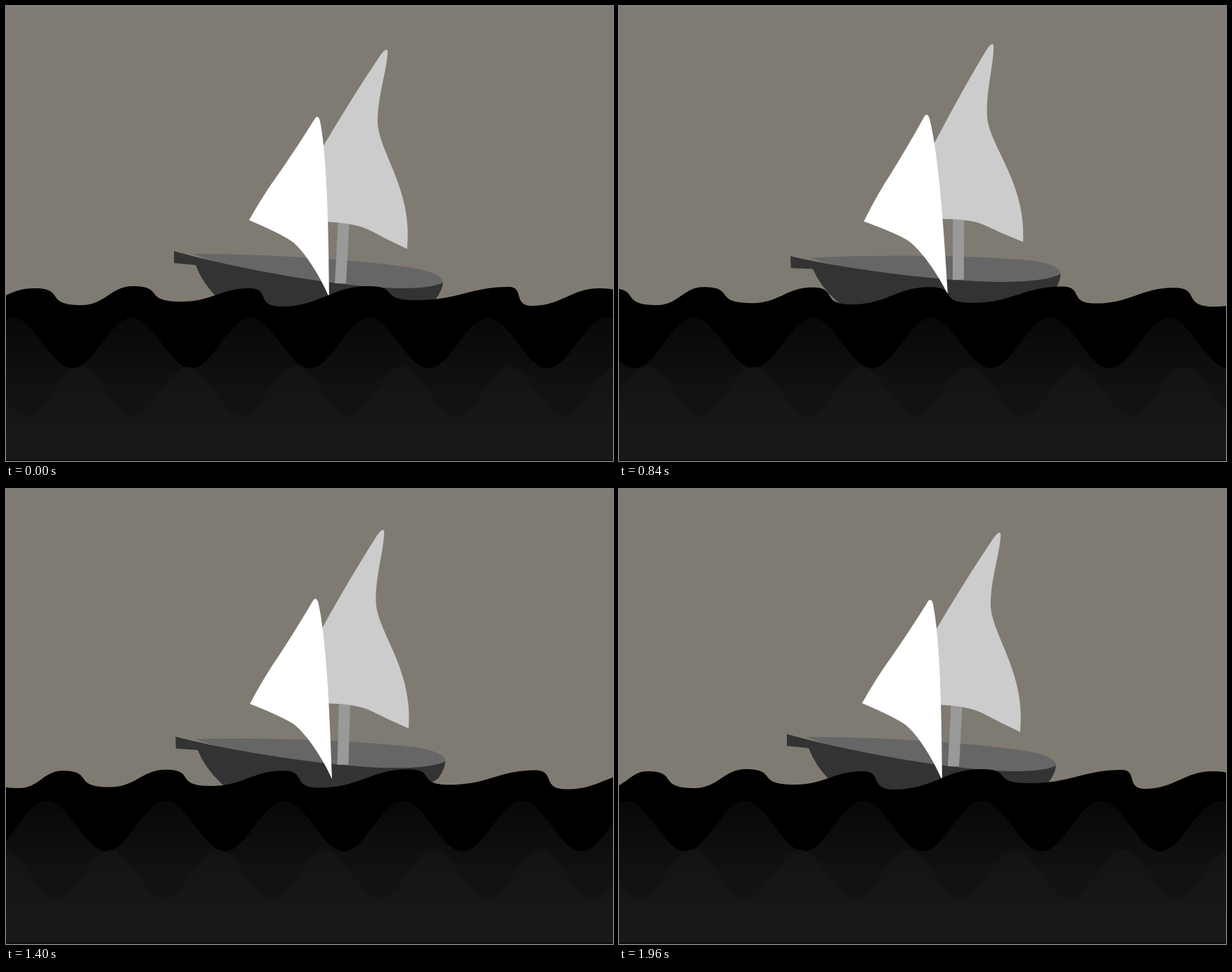
An HTML page with a canvas for the animation above (2 s loop, 864 by 648 pixels).

```html
<!DOCTYPE html>
<html lang="en">
<head>
<meta charset="utf-8">
<title>Sailing boat</title>
<style>
html, body { margin: 0; height: 100%; overflow: hidden; background: #807b72; }
canvas { display: block; }
</style>
</head>
<body>
<canvas width="864" height="648"></canvas>
<script>
const W = 864, H = 648, LOOP = 2000, STEP = 40, LAST = LOOP - STEP;
const ctx = document.querySelector('canvas').getContext('2d');
const mix = (a, b, k) => a + (b - a) * k;

// Front waves: a crest and the trough to its right, plus one spare wave off each side.
const shift = ([cx, cy, tx, ty], dx) => [cx + dx, cy, tx + dx, ty];
const shown = [
  [40, 402, 108, 426],
  [180, 399, 250, 421],
  [346, 402, 392, 428],
  [515, 399, 585, 419],
  [716, 400, 748, 427],
  [845, 402, 922, 429]
];
const waves = [shift(shown[0], -125), ...shown, shift(shown[5], 215)];

// Drawn back to front, in the pose at the start of the loop.
const boat = {
  deck: ['#666', 'M266 353C390 353 520 364 580 373Q622 381 622 394C615 400 590 404 560 404C480 401 350 386 266 353Z'],
  hull: ['#333', 'M239 349C330 375 480 401 560 402Q606 402 622 394Q621 405 612 417C590 445 340 455 302 417Q279 394 270 369L239 366Z'],
  mast: ['#999', 'M473 303H489L484 395H468Z'],
  mainsail: ['#ccc', 'M440 307L452 199Q494 128 531 73C539 61 545 58 543 70C541 95 529 130 529 165C530 208 580 262 571 346Q543 333 517 319Q492 307 440 307Z'],
  jib: ['#fff', 'M346 305Q368 266 388 239Q415 200 438 163Q444 152 447 164C457 215 459 312 460 415C445 380 423 348 408 336Q393 325 346 305Z']
};
const parts = Object.values(boat).map(([color, d]) => [color, new Path2D(d)]);

function drawBoat(tilt) {
  ctx.save();
  ctx.translate(381, 258);
  ctx.rotate(tilt);
  ctx.translate(-381, -258);
  for (const [color, path] of parts) {
    ctx.fillStyle = color;
    ctx.fill(path);
  }
  ctx.restore();
}

// Each wave morphs into its left neighbour over one loop:
// a long even rise, then a steep drop behind the crest.
function drawWaves(k) {
  const now = waves.slice(1).map((w, i) => w.map((v, j) => mix(v, waves[i][j], k)));
  let x = now[0][0] - 80, y = 421;
  const curve = (nx, ny, a, b) => {
    ctx.bezierCurveTo(mix(x, nx, a), y, mix(x, nx, b), ny, nx, ny);
    [x, y] = [nx, ny];
  };
  ctx.beginPath();
  ctx.moveTo(x, H);
  ctx.lineTo(x, y);
  for (const [cx, cy, tx, ty] of now) {
    curve(cx, cy, 0.45, 0.58);
    curve(tx, ty, 0.68, 0.18);
  }
  ctx.lineTo(x, H);
  ctx.fillStyle = '#000';
  ctx.fill();
}

// A sine swell that travels one wavelength to the left per loop.
function drawSwell(k, crest, length, top, height, from, to) {
  const fill = ctx.createLinearGradient(0, top, 0, top + height * 1.5);
  fill.addColorStop(0, from);
  fill.addColorStop(1, to);
  ctx.beginPath();
  ctx.moveTo(0, H);
  for (let x = 0; x <= W; x += 4) {
    const phase = ((x - crest) / length + k) * 2 * Math.PI;
    ctx.lineTo(x, top + height * (1 - Math.cos(phase)) / 2);
  }
  ctx.lineTo(W, H);
  ctx.fillStyle = fill;
  ctx.fill();
}

// A quick roll up, then a slow even roll back.
const roll = t => Math.min(t / 405, (LAST - t) / 1400);

function draw(time) {
  const t = Math.floor(time % LOOP / STEP) * STEP;
  const k = t / LAST;
  ctx.fillStyle = '#807b72';
  ctx.fillRect(0, 0, W, H);
  drawBoat(-0.0645 * roll(t));
  drawWaves(k);
  drawSwell(k, 10, 169, 444, 72, '#080808', '#121212');
  drawSwell(k, 105, 153, 514, 70, '#131313', '#181818');
  ctx.fillStyle = '#120a10';
  ctx.fillRect(0, H - 2, W, 2);
}

const start = performance.now();
function tick() {
  draw(performance.now() - start);
  requestAnimationFrame(tick);
}
tick();
</script>
</body>
</html>
```
